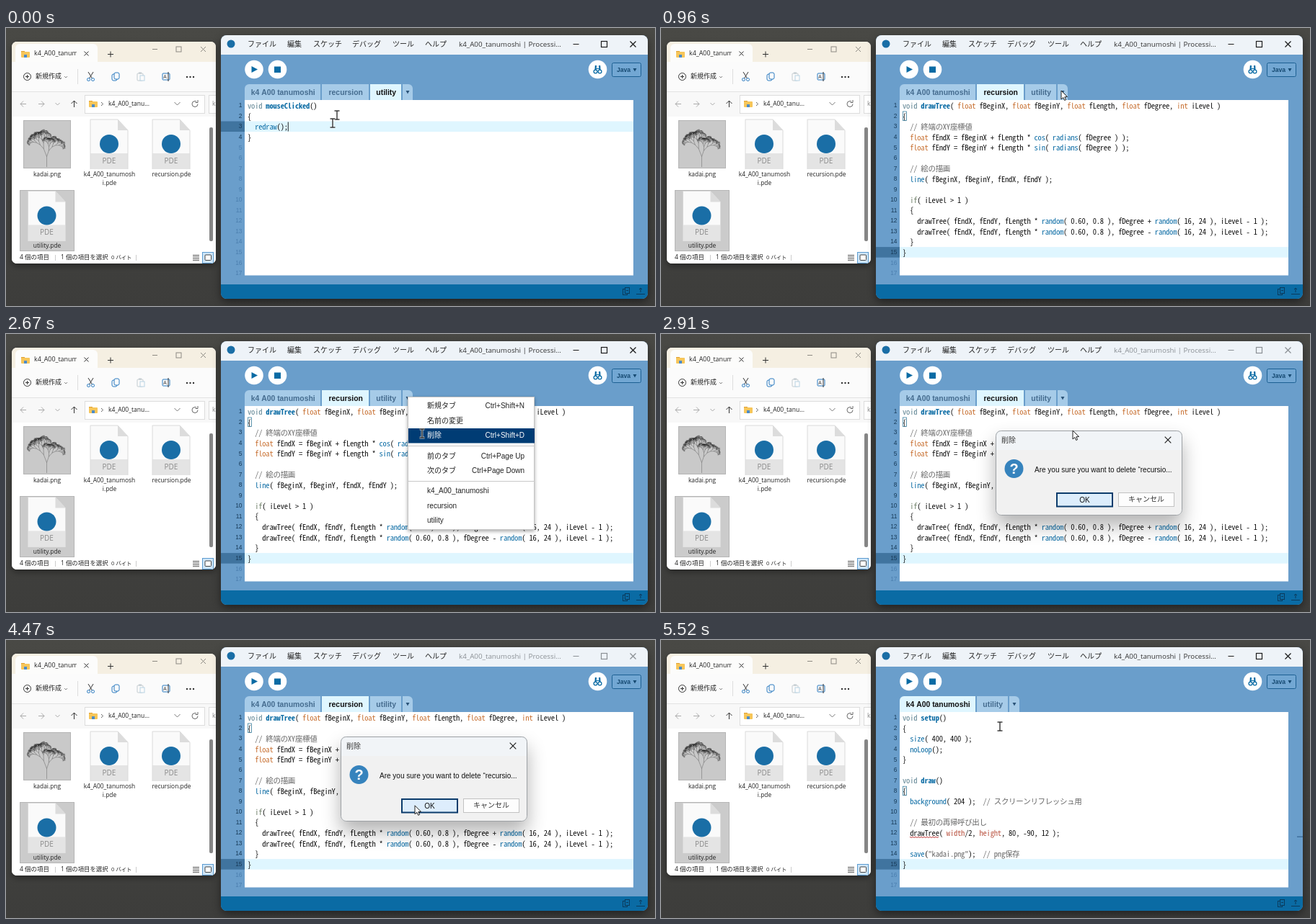
Animation of 900x386 px, one loop 5.55 s. Source, as an HTML page with a canvas:

```html
<!DOCTYPE html>
<html lang="ja">
<head>
<meta charset="utf-8">
<title>Sketch editor: deleting a tab</title>
<style>
html, body { margin: 0; width: 100%; height: 100%; overflow: hidden; background: #42423f; }
canvas { display: block; }
</style>
</head>
<body>
<canvas id="stage" width="900" height="386"></canvas>
<script>
const W = 900, H = 386, LOOP = 5550;
const UI = '"Open Sans", "Noto Sans CJK JP", sans-serif';
const ARIAL = '"Liberation Sans", "Noto Sans CJK JP", sans-serif';
const MONO = '"Noto Sans Mono CJK JP", "Noto Sans CJK JP", "Noto Sans Mono", monospace';
const BODY = '#6a9ecb', BLUE = '#0a6ba4', LIT = '#dff6ff', LOGO = '#1a6ea6';
const PROJECT = 'k4_A00_tanumoshi';
const CELL = 5.07, ROW = 14.55;

const stage = document.getElementById('stage').getContext('2d');
let c = stage;

// ---- drawing helpers ----
function rect(x, y, w, h, fill, stroke, lw = 1) {
  if (fill) { c.fillStyle = fill; c.fillRect(x, y, w, h); }
  if (stroke) { c.strokeStyle = stroke; c.lineWidth = lw; c.strokeRect(x, y, w, h); }
}
function round(x, y, w, h, r, fill, stroke, lw = 1) {
  c.beginPath();
  c.roundRect(x, y, w, h, r);
  if (fill) { c.fillStyle = fill; c.fill(); }
  if (stroke) { c.strokeStyle = stroke; c.lineWidth = lw; c.stroke(); }
}
function disc(x, y, r, fill, stroke, lw = 1) {
  c.beginPath();
  c.arc(x, y, r, 0, Math.PI * 2);
  if (fill) { c.fillStyle = fill; c.fill(); }
  if (stroke) { c.strokeStyle = stroke; c.lineWidth = lw; c.stroke(); }
}
function trace(pts) {
  c.beginPath();
  for (let i = 0; i < pts.length; i += 2) c.lineTo(pts[i], pts[i + 1]);
}
function line(color, lw, ...pts) {
  trace(pts);
  c.strokeStyle = color; c.lineWidth = lw; c.stroke();
}
function poly(fill, ...pts) {
  trace(pts);
  c.closePath();
  c.fillStyle = fill; c.fill();
}
function text(s, x, y, font, color = '#222', align = 'left') {
  c.font = font; c.fillStyle = color; c.textAlign = align;
  c.textBaseline = 'middle';
  c.fillText(s, x, y);
}
function cross(x, y, r, color, lw = 1) {
  line(color, lw, x - r, y - r, x + r, y + r);
  line(color, lw, x + r, y - r, x - r, y + r);
}
function chevron(x, y, r, color) {
  line(color, 1, x - r, y - r / 2, x, y + r / 2, x + r, y - r / 2);
}
function shadow(blur, dy, alpha) {
  c.shadowColor = `rgba(0,0,0,${alpha})`;
  c.shadowBlur = blur; c.shadowOffsetY = dy;
}
function noShadow() { c.shadowColor = 'transparent'; }
function windowButtons(xs, y, r, color, lw) {
  line(color, lw, xs[0] - r, y, xs[0] + r, y);
  rect(xs[1] - r, y - r, r * 2, r * 2, null, color, lw);
  cross(xs[2], y, r, color, lw);
}

// ---- file browser ----
function tree(rand, x, y, len, deg, level) {
  const a = deg * Math.PI / 180, ex = x + len * Math.cos(a), ey = y + len * Math.sin(a);
  c.moveTo(x, y);
  c.lineTo(ex, ey);
  if (level < 2) return;
  tree(rand, ex, ey, len * (0.6 + 0.2 * rand()), deg + 16 + 8 * rand(), level - 1);
  tree(rand, ex, ey, len * (0.6 + 0.2 * rand()), deg - 16 - 8 * rand(), level - 1);
}
function thumbnail() {
  rect(24.5, 128.5, 65, 66, '#c9c9c9', '#b4b4b4');
  let seed = 41;
  const rand = () => (seed = seed * 16807 % 2147483647) / 2147483647;
  c.beginPath();
  tree(rand, 56.5, 193, 14.5, -90, 11);
  c.strokeStyle = '#2a2a2a'; c.lineWidth = 0.32; c.stroke();
}
function pdeIcon(x, y) {
  poly('#fafafa', x, y, x + 38, y, x + 52, y + 15, x + 52, y + 69, x, y + 69);
  rect(x, y + 47, 52, 22, '#e4e4e4');
  line('#dadada', 1, x, y + 69, x, y, x + 38, y, x + 52, y + 15, x + 52, y + 69);
  poly('#dcdcdc', x + 38, y, x + 38, y + 15, x + 52, y + 15);
  disc(x + 26, y + 34, 13, LOGO);
  text('PDE', x + 26, y + 58, '10px ' + UI, '#8a8a8a', 'center');
}
function folder(x, y) {
  rect(x, y - 4, 5, 3, '#e0a030');
  round(x, y - 3, 12, 8, 1, '#f7c65a');
  rect(x + 4, y + 1, 4, 4, '#4d8cc8');
}
function browser() {
  const small = '8.4px ' + UI, ink = '#333', pale = '#aaa';
  shadow(8, 3, 0.4);
  round(8, 19, 283, 308, 7, '#fff');
  noShadow();
  c.save();
  c.beginPath(); c.roundRect(8, 19, 283, 308, 7); c.clip();
  rect(8, 19, 283, 29, '#f5efe2');
  round(13, 22, 114, 32, 6, '#fcfcfb');
  rect(8, 47, 283, 41, '#fbfbfb');
  rect(8, 88, 283, 35, '#f8f8f8');
  line('#e2e2e2', 1, 8, 88.5, 291, 88.5);
  folder(21, 36);
  c.save();
  c.beginPath(); c.rect(38, 26, 60, 20); c.clip();
  text(PROJECT, 39, 36, '8.9px ' + UI);
  c.restore();
  cross(111.5, 35.5, 3, ink);
  line(ink, 1, 141, 36.5, 149, 36.5);
  line(ink, 1, 145, 32.5, 145, 40.5);
  windowButtons([206.5, 239.5, 273.5], 29.5, 3.5, '#8d8a83', 1);

  disc(29.5, 67.5, 5, null, ink);
  line(ink, 1, 27, 67.5, 32, 67.5);
  line(ink, 1, 29.5, 65, 29.5, 70);
  text('新規作成', 41, 67.5, '9px ' + UI);
  chevron(83, 68, 2, '#888');
  line('#ddd', 1, 99.5, 57, 99.5, 78);
  line(ink, 1, 114, 61, 119.5, 70);
  line(ink, 1, 121, 61, 115.5, 70);
  disc(114.5, 71.5, 2, null, '#2b7bc0');
  disc(120.5, 71.5, 2, null, '#2b7bc0');
  round(147, 64, 7, 9, 2, null, '#2b7bc0');
  round(150, 62, 7, 9, 2, '#fbfbfb', '#2b7bc0');
  round(182, 63, 8, 10, 1, null, '#c3cbd0');
  rect(186, 66, 6, 7, '#fbfbfb', '#b9d4e4');
  rect(184, 61.5, 4, 2, '#c3cbd0');
  round(217, 63, 10, 9, 1, null, '#2b7bc0');
  text('A', 220.5, 68, '7px ' + UI, ink, 'center');
  line(ink, 1, 225, 61, 225, 74);
  for (let i = -1; i < 2; i++) disc(255.5 + i * 4.5, 68, 1.2, ink);

  line(pale, 1, 28, 105.5, 20, 105.5);
  line(pale, 1, 24, 101.5, 20, 105.5, 24, 109.5);
  line(pale, 1, 45, 105.5, 53, 105.5);
  line(pale, 1, 49, 101.5, 53, 105.5, 49, 109.5);
  chevron(71.5, 105.5, 3, pale);
  line(ink, 1, 94.5, 110, 94.5, 101);
  line(ink, 1, 90.5, 105, 94.5, 101, 98.5, 105);
  rect(109.5, 93.5, 166, 25, '#fff', '#dcdcdc');
  rect(281.5, 93.5, 20, 25, '#fff', '#dcdcdc');
  folder(115, 105);
  line('#666', 1, 132, 103, 134.5, 105.5, 132, 108);
  text('k4_A00_tanu...', 142, 105.5, '8.5px ' + UI);
  text('k', 286, 105.5, '8.5px ' + UI, '#888');
  chevron(237.5, 105, 4, '#777');
  c.beginPath(); c.arc(262, 105.5, 4, 0, 5.3);
  c.strokeStyle = '#666'; c.lineWidth = 1; c.stroke();
  line('#666', 1, 266, 100, 266, 103.5, 262.5, 103.5);

  rect(8, 123, 283, 204, '#fff');
  thumbnail();
  pdeIcon(117, 127);
  pdeIcon(203, 127);
  rect(19.5, 225.5, 75, 84, '#cbcbcb', '#b5b5b5');
  pdeIcon(30.5, 226.5);
  text('kadai.png', 57, 203.5, small, '#222', 'center');
  text('k4_A00_tanumosh', 143.5, 203.5, small, '#222', 'center');
  text('i.pde', 143.5, 215.5, small, '#222', 'center');
  text('recursion.pde', 229.5, 203.5, small, '#222', 'center');
  text('utility.pde', 57, 302.5, small, '#222', 'center');
  round(282, 138, 5, 158, 2, '#868686');

  text('4 個の項目', 19, 319, '8.5px ' + UI);
  line('#ccc', 1, 68.5, 315, 68.5, 323);
  text('1 個の項目を選択', 76, 319, '8.4px ' + UI);
  text('0 バイト', 146, 319, '7.4px ' + UI);
  line('#ccc', 1, 180.5, 315, 180.5, 323);
  for (let i = 0; i < 4; i++) line('#555', 1, 259, 315.5 + i * 2.4, 268, 315.5 + i * 2.4);
  rect(272.5, 311.5, 15, 15, '#cfe6f8', '#5b9bd0');
  round(276, 315, 8.5, 7.5, 1, '#fff', '#444');
  c.restore();
}

// ---- code pages ----
const PAGES = {
  utility: {
    tab: 2, row: 3, caret: 11,
    code: `void mouseClicked()
{
  redraw();
}`
  },
  recursion: {
    tab: 1, row: 15, mate: 2,
    code: `void drawTree( float fBeginX, float fBeginY, float fLength, float fDegree, int iLevel )
{
  // 終端のXY座標値
  float fEndX = fBeginX + fLength * cos( radians( fDegree ) );
  float fEndY = fBeginY + fLength * sin( radians( fDegree ) );

  // 絵の描画
  line( fBeginX, fBeginY, fEndX, fEndY );

  if( iLevel > 1 )
  {
    drawTree( fEndX, fEndY, fLength * random( 0.60, 0.8 ), fDegree + random( 16, 24 ), iLevel - 1 );
    drawTree( fEndX, fEndY, fLength * random( 0.60, 0.8 ), fDegree - random( 16, 24 ), iLevel - 1 );
  }
}`
  },
  main: {
    tab: 0, row: 15, mate: 8, caret: 1,
    code: `void setup()
{
  size( 400, 400 );
  noLoop();
}

void draw()
{
  background( 204 );  // スクリーンリフレッシュ用

  // 最初の再帰呼び出し
  drawTree( width/2, height, 80, -90, 12 );

  save("kadai.png");  // png保存
}`
  }
};
const TOKEN = /\/\/.*|"[^"]*"|\w+|\s+|./g;
const STYLES = [
  [/^\/\/|^"/, '#666'],
  [/^void$/, '#5b8090'],
  [/^(float|int)$/, '#c76f30'],
  [/^if$/, '#6f7f68'],
  [/^(width|height)$/, '#b9523f'],
  [/^(redraw|size|noLoop|background|save|line|cos|sin|radians|random|mouseClicked|setup|draw)$/, BLUE]
];
function codeLine(src, y) {
  let col = 0, prev = '';
  for (const tok of src.match(TOKEN) || []) {
    const decl = prev === 'void';
    const style = STYLES.find(s => s[0].test(tok));
    const color = decl ? BLUE : style ? style[1] : '#111';
    const font = (decl ? 'bold ' : '') + '10.5px ' + MONO;
    for (const ch of tok) {
      if (ch !== ' ') text(ch, 335 + col * CELL, y, font, color);
      col += ch.charCodeAt(0) > 255 ? 2 : 1;
    }
    if (tok.trim()) prev = tok;
  }
}
const rowTop = n => 100.4 + (n - 1) * ROW;

function editor(page, caretOn, errorOn) {
  rect(331, 100, 539, 243.5, '#fff');
  c.save();
  c.beginPath(); c.rect(298, 100, 592, 243.5); c.clip();
  rect(298, rowTop(page.row), 33, ROW, '#40749f');
  rect(331, rowTop(page.row), 539, ROW, LIT);
  const rows = page.code.split('\n');
  for (let n = 1; n <= 17; n++) {
    const y = rowTop(n) + 7.6, used = n <= rows.length;
    text(n, 327.5, y, '8.4px ' + ARIAL, used ? '#173a58' : '#4b7faf', 'right');
    if (used) codeLine(rows[n - 1], y);
  }
  if (page.mate) rect(335.5, rowTop(page.mate) + 1, 5, 12.5, null, '#3b7f9f', 0.8);
  if (caretOn && page.caret) {
    rect(335 + page.caret * CELL, rowTop(page.row) + 1, 1, 13, '#222');
  }
  if (errorOn) {
    const y = rowTop(12) + 13.4;
    c.beginPath();
    for (let i = 0; i <= 20; i++) c.lineTo(345 + i * 2, y + (i % 2 ? 0.6 : -0.6));
    c.strokeStyle = '#c23b3b'; c.lineWidth = 1; c.stroke();
  }
  c.restore();
  if (errorOn) rect(882, 272.5, 8, 1.5, '#3f719e');
}

function tabs(active, deleted) {
  const list = [[PROJECT.replace(/_/g, ' '), 105, 0], ['recursion', 65, 1], ['utility', 43, 2]];
  let x = 331;
  for (const [name, w, id] of list) {
    if (deleted && id === 1) continue;
    const on = id === active;
    round(x, 78, w, 22, [id ? 0 : 6, 0, 0, 0], on ? LIT : '#a6cbe8');
    text(name, x + w / 2 + 0.7, 90, 'bold 10.4px ' + ARIAL, on ? '#111' : '#456c8f', 'center');
    x += w + 2;
  }
  round(x, 78, 14, 22, [0, 6, 0, 0], '#a6cbe8');
  poly('#2a5378', x + 4.5, 87, x + 9.5, 87, x + 7, 91.5);
}

function ide(s) {
  const ink = s.focus ? '#1d1d1d' : '#8b9095';
  shadow(12, 4, 0.45);
  round(298, 10, 592, 366, 8, BODY);
  noShadow();
  c.save();
  c.beginPath(); c.roundRect(298, 10, 592, 366, 8); c.clip();
  rect(298, 10, 592, 27, '#eef3f8');
  disc(312, 22, 5.5, LOGO);
  const menus = [['ファイル', 335], ['編集', 390], ['スケッチ', 426], ['デバッグ', 480], ['ツール', 536], ['ヘルプ', 581]];
  for (const [name, x] of menus) text(name, x, 23, '10px ' + UI, '#222');
  text(PROJECT + ' | Processi...', 628, 23, '9.8px ' + UI, s.focus ? '#333' : '#8b9095');
  windowButtons([790.5, 829.5, 869.5], 22.5, 4, ink, 1.2);

  disc(344, 57.5, 12.8, '#fff');
  poly(BLUE, 340.5, 53, 340.5, 62, 349, 57.5);
  disc(376.5, 57.5, 12.8, '#fff');
  rect(372, 53.5, 9, 8.5, BLUE);
  disc(820.5, 57.5, 12.8, '#fff');
  for (const k of [-1, 1]) {
    disc(820.5 + k * 3, 60.5, 2.4, null, BLUE, 1.3);
    line(BLUE, 2.2, 820.5 + k * 3, 58, 820.5 + k * 2.6, 52);
  }
  line(BLUE, 1, 818, 56.5, 823, 56.5);
  round(840.5, 48.5, 40, 19, 2, '#72a7d3', '#1c5f92');
  text('Java', 847, 58.5, 'bold 8.6px ' + ARIAL, '#164a72');
  poly('#164a72', 869.5, 56, 874.5, 56, 872, 60.5);

  tabs(s.page.tab, s.deleted);
  editor(s.page, s.caret, s.error);
  rect(298, 356, 592, 20, BLUE);
  rect(855.5, 362.5, 6, 8, null, '#0a3a5c');
  rect(858.5, 360.5, 6, 8, BLUE, '#0a3a5c');
  line('#0a3a5c', 1, 860, 364.5, 863, 364.5);
  line('#0a3a5c', 1, 874, 369.5, 886, 369.5);
  line('#0a3a5c', 1, 880, 367, 880, 361);
  line('#0a3a5c', 1, 878, 363, 880, 361, 882, 363);
  c.restore();
}

// ---- popup menu and dialog ----
const ITEMS = [
  [100.5, '新規タブ', 'Ctrl+Shift+N'], [121, '名前の変更'], [141.5, '削除', 'Ctrl+Shift+D'],
  [170, '前のタブ', 'Ctrl+Page Up'], [190.5, '次のタブ', 'Ctrl+Page Down'],
  [218.5, PROJECT], [239, 'recursion'], [259.5, 'utility']
];
function popup(pos) {
  shadow(5, 2, 0.35);
  rect(557, 87, 176, 185, '#fff');
  noShadow();
  rect(557.5, 87.5, 175, 184, null, '#c4c4c4');
  for (const y of [155.5, 204.5]) line('#c8c8c8', 1, 558, y, 733, y);
  for (const [y, label, keys] of ITEMS) {
    const on = pos.x > 558 && Math.abs(pos.y - y) <= 10.2;
    if (on) rect(558, y - 10.5, 175, 20.5, '#003c74');
    const ink = on ? '#fff' : '#222';
    text(label, 584, y, '10px ' + ARIAL, ink);
    if (keys) text(keys, 719, y, '10px ' + ARIAL, ink, 'right');
  }
}
function dialog(alpha, scale, pulse) {
  const layer = makeLayer();
  const back = c;
  c = layer;
  shadow(26, 14, 0.3);
  round(464, 134, 259, 118, 7, '#f1f1f1');
  noShadow();
  round(464, 134, 259, 27, [7, 7, 0, 0], '#f1f4f7');
  round(464.5, 134.5, 258, 117, 7, null, '#9da1a5');
  text('削除', 472, 148, '10px ' + UI, '#333');
  cross(703, 147, 4.3, '#222', 1.2);
  disc(489.5, 187, 13, '#3683bd');
  text('?', 489.5, 188, 'bold 20px ' + ARIAL, '#fff', 'center');
  text('Are you sure you want to delete “recursio...', 518, 189, '10px ' + ARIAL, '#111');
  const g = Math.round(246 - 9 * pulse), r = Math.round(240 - 20 * pulse);
  rect(549, 221, 77, 18.5, `rgb(${r},${g},252)`, '#0c3c6c', 2);
  text('OK', 587.5, 231, '10px ' + ARIAL, '#111', 'center');
  rect(634.5, 220.5, 77, 19, '#fdfdfd', '#c2c2c2');
  text('キャンセル', 673, 230.5, '10px ' + UI, '#333', 'center');
  c = back;
  c.save();
  c.globalAlpha = alpha;
  c.translate(593.5, 193);
  c.scale(scale, scale);
  c.translate(-593.5, -193);
  c.drawImage(layer.canvas, 0, 0);
  c.restore();
}
let scratch;
function makeLayer() {
  if (!scratch) scratch = newCanvas();
  scratch.clearRect(0, 0, W, H);
  return scratch;
}
function newCanvas() {
  const el = document.createElement('canvas');
  el.width = W; el.height = H;
  return el.getContext('2d');
}

// ---- pointer ----
const PATH = [
  [0, 453, 132], [60, 454, 130], [400, 470, 89], [600, 471, 89], [900, 555, 87],
  [1170, 555, 87], [1710, 577, 138], [2670, 577, 138], [2820, 571, 134],
  [3120, 571, 134], [3690, 567, 229], [4740, 567, 230], [5460, 470, 120], [LOOP, 470, 120]
];
const clamp = v => Math.max(0, Math.min(1, v));
const ease = v => v * v * (3 - 2 * v);
function pointerAt(t) {
  const i = PATH.findIndex((p, n) => n && t <= p[0]);
  const [t0, x0, y0] = PATH[i - 1], [t1, x1, y1] = PATH[i];
  const k = ease((t - t0) / (t1 - t0));
  return { x: x0 + (x1 - x0) * k, y: y0 + (y1 - y0) * k };
}
function arrow(x, y) {
  trace([x, y, x, y + 12, x + 2.8, y + 9.5, x + 4.7, y + 13.5, x + 6.6, y + 12.6, x + 4.8, y + 8.8, x + 8.5, y + 8.5]);
  c.closePath();
  c.fillStyle = '#fff'; c.fill();
  c.strokeStyle = '#222'; c.lineWidth = 1; c.stroke();
}
function beam(x, y) {
  for (const [color, lw] of [['rgba(255,255,255,.7)', 3], ['#222', 1.3]]) {
    line(color, lw, x, y - 6, x, y + 6);
    line(color, lw, x - 3.5, y - 6, x + 3.5, y - 6);
    line(color, lw, x - 3.5, y + 6, x + 3.5, y + 6);
  }
}

// ---- timeline ----
const CLICK_TAB = 450, OPEN_MENU = 1080, OPEN_DIALOG = 2700, CLOSE_DIALOG = 4560;

const backdrop = newCanvas();
c = backdrop;
const shade = c.createLinearGradient(0, 0, 0, H);
shade.addColorStop(0, '#494945');
shade.addColorStop(1, '#3d3d3b');
rect(0, 0, W, H, shade);
browser();
c = stage;

function draw(t) {
  const pos = pointerAt(t);
  const deleted = t >= CLOSE_DIALOG;
  const inDialog = t >= OPEN_DIALOG && !deleted;
  const page = deleted ? PAGES.main : t < CLICK_TAB ? PAGES.utility : PAGES.recursion;
  c.drawImage(backdrop.canvas, 0, 0);
  ide({
    page, deleted, focus: !inDialog,
    caret: t < CLICK_TAB || (deleted && t < 5060),
    error: t >= 5130
  });
  if (t >= OPEN_MENU && t < OPEN_DIALOG) popup(pos);

  const pulse = 0.5 + 0.5 * Math.cos((t - 2910) / 840 * Math.PI);
  if (inDialog) {
    const k = clamp((t - OPEN_DIALOG + 30) / 150);
    dialog(k, 0.92 + 0.08 * ease(k), pulse);
  } else if (deleted && t < 4770) {
    const k = (t - CLOSE_DIALOG) / 210;
    dialog(1 - k, 1 - 0.053 * k, pulse);
  }

  if (t < 30) beam(459, 121);
  if (inDialog || pos.y < 100) arrow(pos.x, pos.y);
  else beam(pos.x, pos.y);
}

const start = performance.now();
function tick() {
  draw((performance.now() - start) % LOOP);
  requestAnimationFrame(tick);
}
tick();
</script>
</body>
</html>
```
